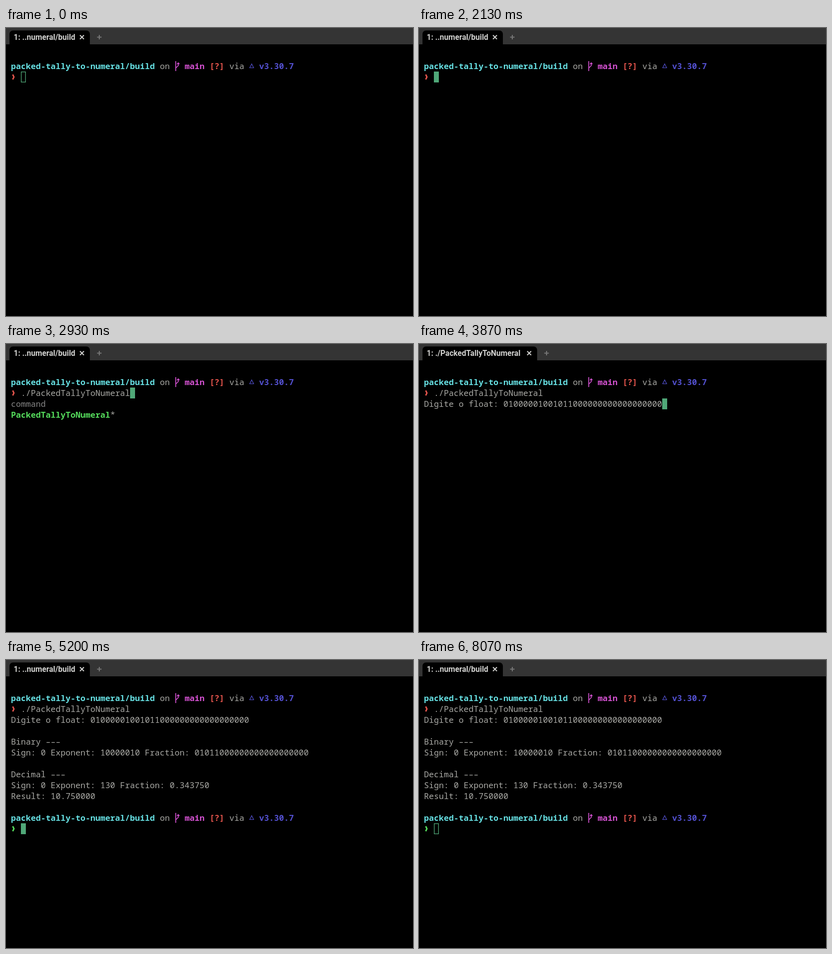
Write an HTML page with a canvas that moves like this. It is 820 by 582 pixels and loops after 8.14 s.

```html
<!DOCTYPE html>
<html lang="pt">
<head>
<meta charset="utf-8">
<title>Terminal</title>
<style>
html, body { margin: 0; width: 100%; height: 100%; overflow: hidden; background: #000; }
canvas { display: block; }
</style>
</head>
<body>
<canvas id="stage" width="820" height="582"></canvas>
<script>
const ctx = document.getElementById('stage').getContext('2d');
const LOOP = 8140, CELL = 10, ROW = 22, LEFT = 10, TOP = 66;
const PROGRAM = 'PackedTallyToNumeral';
const COMMAND = './' + PROGRAM;
const BITS = '01000001001011'.padEnd(32, '0');
const TEXT = '#a8a8a4', DIM = '#848484', CYAN = '#66dfe2', RED = '#e3544c', GREEN = '#55dc5c',
      PINK = '#d552d2', PURPLE = '#5350cf', CURSOR = '#50a878', BAR = '#343434', TITLE = '#d2d2d0';

// Moments at which the screen changes, in ms
const AT = {
  focus: 70, dot: 2200, slash: 2400, complete: 2670, run: 3000, ask: 3070,
  paste: 3800, output: 4730, prompt: 4800, blur: 7930
};

const OUTPUT = [
  [4, 'Binary –––'],
  [5, 'Sign: 0 Exponent: 10000010 Fraction: ' + '01011'.padEnd(23, '0')],
  [7, 'Decimal –––'],
  [8, 'Sign: 0 Exponent: 130 Fraction: 0.343750'],
  [9, 'Result: 10.750000']
];

const colX = col => LEFT + col * CELL;
const rowY = row => TOP + row * ROW;

function write(row, col, text, color = TEXT, weight = 400) {
  ctx.font = `${weight} 16.667px "Noto Sans Mono", "DejaVu Sans Mono", monospace`;
  ctx.fillStyle = color;
  ctx.fillText(text, colX(col), rowY(row) + 17);
}

function lines(color, width, ...paths) {
  ctx.strokeStyle = color;
  ctx.lineWidth = width;
  ctx.beginPath();
  for (const path of paths)
    path.forEach(([x, y], i) => i ? ctx.lineTo(x, y) : ctx.moveTo(x, y));
  ctx.stroke();
}

function drawTab(title, right) {
  ctx.fillStyle = BAR;
  ctx.fillRect(0, 0, 820, 33);
  ctx.fillStyle = '#000';
  ctx.beginPath();
  ctx.roundRect(7, 5, right - 7, 28, [7, 7, 0, 0]);
  ctx.fill();
  ctx.font = 'bold 15.6px Roboto, "Liberation Sans", sans-serif';
  ctx.fillStyle = TITLE;
  ctx.fillText('1: ' + title, 15.5, 24);
  const x = right - 16, y = 18.5, plus = right + 19.5;
  lines(TITLE, 2, [[x - 4, y - 4], [x + 4, y + 4]], [[x + 4, y - 4], [x - 4, y + 4]]);
  lines('#777', 2, [[plus - 5, y], [plus + 4, y]], [[plus - .5, y - 4.5], [plus - .5, y + 4.5]]);
}

function drawPrompt(row, arrow) {
  const y = rowY(row);
  write(row, 0, 'packed-tally-to-numeral/build', CYAN, 600);
  write(row, 30, 'on');
  lines(PINK, 1.7, [[342, y + 1], [342, y + 21]],
    [[347, y + 5], [347, y + 10], [342, y + 15]],
    [[344.5, y + 7], [347, y + 4.5], [349.5, y + 7]]);
  write(row, 35, 'main', PINK, 600);
  write(row, 40, '[?]', RED, 600);
  write(row, 44, 'via');
  lines(PURPLE, 1.2, [[491, y + 14.5], [495, y + 6.5], [499, y + 14.5], [491, y + 14.5], [495, y + 6.5]]);
  write(row, 50, 'v3.30.7', PURPLE, 600);
  lines(arrow, 2.8, [[13.5, y + 28], [16, y + 33], [13.5, y + 38]]);
}

function drawCursor(row, col, filled) {
  const x = colX(col), y = rowY(row);
  if (filled) {
    ctx.fillStyle = CURSOR;
    ctx.fillRect(x, y, CELL, ROW);
  } else {
    ctx.strokeStyle = CURSOR;
    ctx.lineWidth = 1.3;
    ctx.strokeRect(x + .7, y + .7, CELL - 1.4, ROW - 1.4);
  }
}

function typedAt(t) {
  if (t >= AT.complete) return COMMAND;
  return COMMAND.slice(0, t >= AT.slash ? 2 : t >= AT.dot ? 1 : 0);
}

function draw(t) {
  ctx.fillStyle = '#000';
  ctx.fillRect(0, 0, 820, 582);

  const running = t >= AT.run && t < AT.prompt;
  drawTab(running ? COMMAND : '..numeral/build', running ? 238 : 169);
  drawPrompt(0, RED);

  const typed = typedAt(t);
  write(1, 2, typed);
  let cursor = [1, 2 + typed.length];

  if (t >= AT.complete && t < AT.run) {
    write(2, 0, 'command', DIM);
    write(3, 0, PROGRAM, GREEN, 600);
    write(3, 20, '*');
  }
  if (t >= AT.run) cursor = [2, 0];
  if (t >= AT.ask) {
    const answer = t >= AT.paste ? BITS : '';
    write(2, 0, 'Digite o float: ' + answer);
    cursor = [2, 16 + answer.length];
  }
  if (t >= AT.output) {
    for (const [row, text] of OUTPUT) write(row, 0, text);
    cursor = [10, 0];
  }
  if (t >= AT.prompt) {
    drawPrompt(11, GREEN);
    cursor = [12, 2];
  }
  drawCursor(...cursor, t >= AT.focus && t < AT.blur);
}

const start = performance.now();
function tick() {
  draw((performance.now() - start) % LOOP);
  requestAnimationFrame(tick);
}
tick();
</script>
</body>
</html>
```
